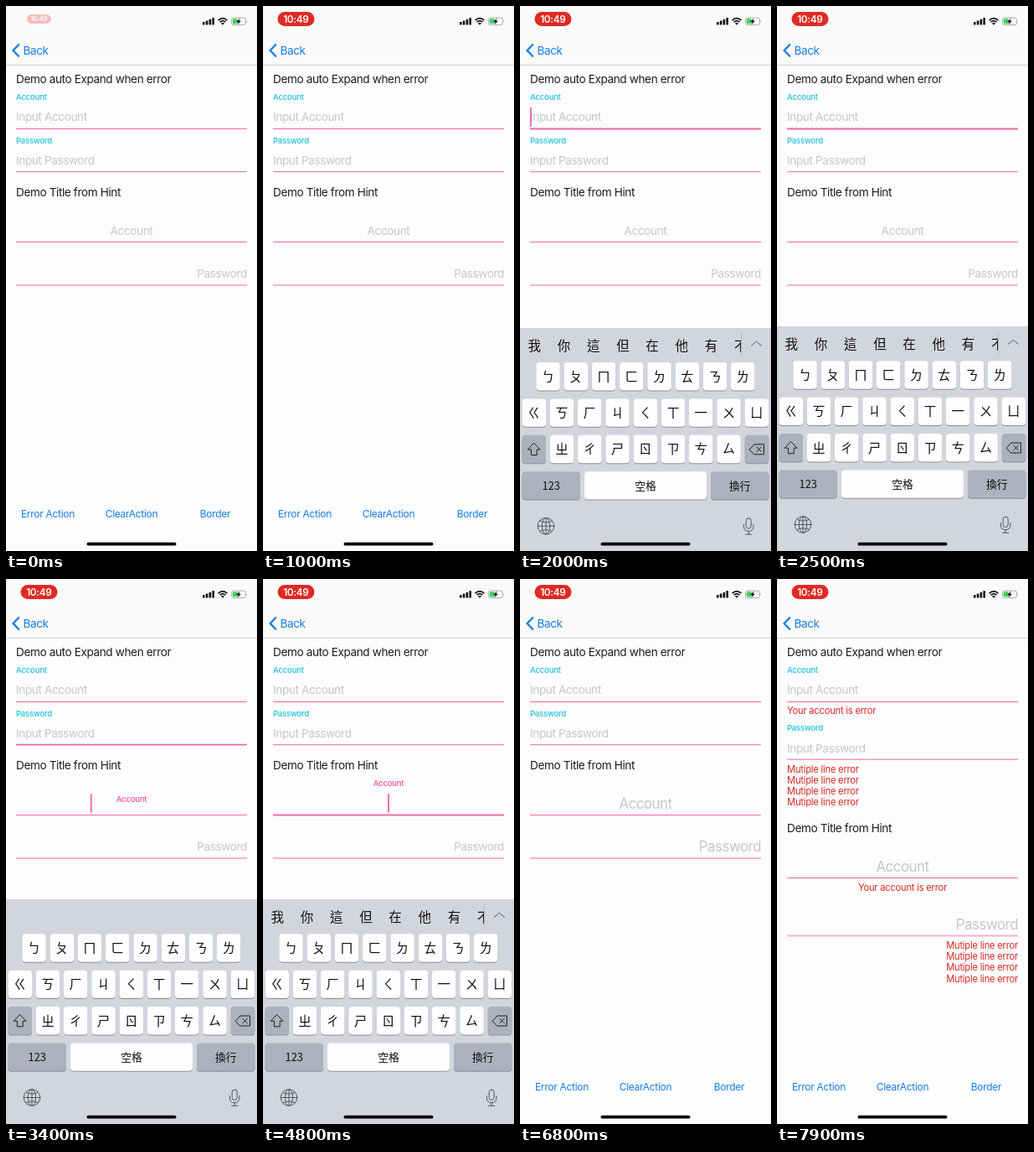
Animation, 300 px wide and 650 px high, one loop 8000 ms. Source, as an HTML page:

```html
<!DOCTYPE html>
<html lang="en">
<head>
<meta charset="utf-8">
<title>Text field demo</title>
<style>
html, body { margin: 0; width: 100%; height: 100%; overflow: hidden; background: #fdfcfe; }
svg { display: block; width: 300px; height: 650px; }
text { font-family: Inter, Roboto, sans-serif; font-size: 13.6px; letter-spacing: -.029em; fill: #1c1c1e; }
.mid { text-anchor: middle; }
.end { text-anchor: end; }
.hint { fill: #c6c6cb; }
.title { font-size: 9.6px; font-weight: 500; letter-spacing: -.025em; fill: #1fc3d6; }
.blue { fill: #157ee0; }
.action { font-size: 12px; letter-spacing: -.024em; }
.error text { font-size: 11.2px; letter-spacing: -.02em; fill: #d62a20; }
.line { stroke: #ee69a3; stroke-width: 1; }
.cursor { fill: #ef5a9c; }
.cjk { font-family: "Noto Sans CJK TC", "Noto Sans CJK JP", "Noto Sans CJK", sans-serif; font-size: 15.5px; letter-spacing: 0; text-anchor: middle; fill: #111; }
.label { font-size: 12.8px; }
.icon { fill: none; stroke: #222; stroke-width: 1; stroke-linecap: round; stroke-linejoin: round; }
.thin { stroke: #555a62; }

/* every timeline is one 8 s loop */
.pill, .line, .caret, .float, .shift, .error, .keyboard, .words, .tap {
  animation: 8s linear infinite;
}
.pill { transform-origin: 39.5px 15.5px; animation-name: pill; }
@keyframes pill {
  0% { transform: scale(.65); opacity: .28; }
  3.75%, 100% { transform: none; opacity: 1; }
}

.keyboard { animation-name: keyboard; }
@keyframes keyboard {
  0%, 20.6% { transform: translateY(270px); animation-timing-function: cubic-bezier(.2, .8, .2, 1); }
  26.25%, 78.1% { transform: none; animation-timing-function: cubic-bezier(.3, .5, .2, 1); }
  83.5%, 100% { transform: translateY(270px); }
}
.words { animation-name: words; animation-timing-function: step-end; }
@keyframes words {
  0%, 35%, 46.25%, 63.75% { opacity: 1; }
  32.5%, 41.25%, 61.25% { opacity: 0; }
}

.l1 { animation-name: line1; }
.l2 { animation-name: line2; }
.l3 { animation-name: line3; }
.l4 { animation-name: line4; }
@keyframes line1 { 0%, 21%, 34%, 100% { stroke-width: 1; } 22.5%, 32.5% { stroke-width: 1.8; } }
@keyframes line2 { 0%, 32.5%, 44%, 100% { stroke-width: 1; } 34%, 42.5% { stroke-width: 1.8; } }
@keyframes line3 { 0%, 42.5%, 63%, 100% { stroke-width: 1; } 44%, 61.25% { stroke-width: 1.8; } }
@keyframes line4 { 0%, 61.25%, 80%, 100% { stroke-width: 1; } 63%, 78.1% { stroke-width: 1.8; } }

.caret { opacity: 0; animation-timing-function: step-end; }
.c1 { animation-name: caret1; }
.c2 { animation-name: caret2; }
.c3 { animation-name: caret3; }
.c4 { animation-name: caret4; }
@keyframes caret1 { 0%, 32.5% { opacity: 0; } 21.25% { opacity: 1; } }
@keyframes caret2 { 0%, 41.25% { opacity: 0; } 32.5% { opacity: 1; } }
@keyframes caret3 { 0%, 61.25% { opacity: 0; } 41.25% { opacity: 1; } }
@keyframes caret4 { 0%, 78.1% { opacity: 0; } 61.25% { opacity: 1; } }
.cursor { animation: blink 1s linear infinite; animation-delay: var(--from); }
@keyframes blink { 0%, 60%, 100% { opacity: 1; } 70%, 90% { opacity: 0; } }
.slide { animation: slide 8s linear infinite; }
@keyframes slide {
  0%, 41.25% { transform: translateX(-137px); animation-timing-function: ease-in-out; }
  43.4%, 100% { transform: none; }
}

/* a hint turns into a small title and returns larger */
.f3 { animation-name: float3; }
.f4 { animation-name: float4; }
@keyframes float3 {
  0%, 41.25% { transform: none; font-size: 13.6px; font-weight: 400; fill: #c6c6cb; }
  41.26% { transform: translateY(-1px); font-size: 9.6px; font-weight: 500; fill: #e8589b; animation-timing-function: ease-in-out; }
  45%, 61.25% { transform: translateY(-25.5px); font-size: 9.6px; font-weight: 500; fill: #e8589b; }
  61.26% { transform: translateY(-25.5px); font-size: 16.9px; font-weight: 400; fill: #c6c6cb; animation-timing-function: ease-in-out; }
  65%, 100% { transform: translateY(1px); font-size: 16.9px; font-weight: 400; fill: #c6c6cb; }
}
@keyframes float4 {
  0%, 61.25% { transform: none; font-size: 13.6px; font-weight: 400; fill: #c6c6cb; }
  61.26% { transform: translateY(-1px); font-size: 9.6px; font-weight: 500; fill: #e8589b; animation-timing-function: ease-in-out; }
  65%, 78.1% { transform: translateY(-25.5px); font-size: 9.6px; font-weight: 500; fill: #e8589b; }
  78.11% { transform: translateY(-25.5px); font-size: 16.9px; font-weight: 400; fill: #c6c6cb; animation-timing-function: ease-in-out; }
  82%, 100% { transform: translateY(1px); font-size: 16.9px; font-weight: 400; fill: #c6c6cb; }
}

/* errors open and push the rows below */
.shift { animation-name: shift; }
@keyframes shift {
  0%, 92.5% { transform: none; animation-timing-function: ease-in-out; }
  96.25%, 100% { transform: translateY(var(--by)); }
}
.error { animation-name: error; }
@keyframes error { 0%, 92.5% { opacity: 0; } 96.25%, 100% { opacity: 1; } }
.tap { animation-name: tap; }
@keyframes tap { 0%, 91%, 94.5%, 100% { opacity: 1; } 91.3%, 92.5% { opacity: .25; } }
</style>
</head>
<body>
<svg viewBox="0 0 300 650">
  <rect width="300" height="650" fill="#fdfcfe"/>
  <rect width="300" height="70" fill="#fafafb"/>
  <path d="M0 70.5H300" stroke="#d3d3d7"/>

  <g class="pill">
    <rect x="17.5" y="7" width="44" height="17" rx="8.5" fill="#e02a23"/>
    <text class="mid" x="39.3" y="19.8" style="font-size:11.8px;font-weight:600;fill:#fff">10:49</text>
  </g>

  <g fill="#111">
    <rect x="235" y="19" width="2.6" height="3.4" rx=".6"/>
    <rect x="238.8" y="17.6" width="2.6" height="4.8" rx=".6"/>
    <rect x="242.6" y="15.8" width="2.6" height="6.6" rx=".6"/>
    <rect x="246.4" y="14" width="2.6" height="8.4" rx=".6"/>
    <path d="M257 20.6Q259 19 261 20.6L259 22.7Z"/>
  </g>
  <path d="M253.6 17.1Q259 12.2 264.4 17.1M255.6 19.2Q259 16.2 262.4 19.2" fill="none" stroke="#111" stroke-width="1.7"/>
  <rect x="269.5" y="14" width="17" height="8.6" rx="2.4" fill="none" stroke="#a5a5a8" stroke-width=".9"/>
  <rect x="270.8" y="15.3" width="6" height="6" rx="1.2" fill="#3fd25f"/>
  <path d="M287.6 16.8Q289 18.3 287.6 19.8Z" fill="#a5a5a8"/>
  <path d="M279.6 14.6L275.2 18.9H277.6L276.6 22.2L281 17.7H278.6Z" fill="#111"/>

  <path d="M15.8 45.5L8.6 53L15.8 60.5" fill="none" stroke="#157ee0" stroke-width="2.3"/>
  <text class="blue" x="20.5" y="58">Back</text>

  <text x="12" y="91.6">Demo auto Expand when error</text>
  <text class="title" x="12" y="112">Account</text>
  <text class="hint" x="12" y="137.4">Input Account</text>
  <path class="line l1" d="M12 146.5H288"/>
  <g class="caret c1"><rect class="cursor" style="--from:-.3s" x="12" y="121" width="1.7" height="23"/></g>
  <g class="error"><text x="12" y="161">Your account is error</text></g>

  <g class="shift" style="--by:17.5px">
    <text class="title" x="12" y="163.5">Password</text>
    <text class="hint" x="12" y="189">Input Password</text>
    <path class="line l2" d="M12 197.7H288"/>
    <g class="caret c2"><rect class="cursor" style="--from:-.4s" x="12" y="172.5" width="1.7" height="23"/></g>
    <g class="error" data-x="12" data-y="213"></g>
  </g>

  <g class="shift" style="--by:75px">
    <text x="12" y="227">Demo Title from Hint</text>
    <text class="float f3 mid" x="150" y="272.5">Account</text>
    <path class="line l3" d="M12 281.5H288"/>
    <g class="caret c3"><g class="slide"><rect class="cursor" style="--from:-.7s" x="149.2" y="256.3" width="1.7" height="22.4"/></g></g>
    <g class="error"><text class="mid" x="150" y="296.6">Your account is error</text></g>
  </g>

  <g class="shift" style="--by:92.5px">
    <text class="float f4 end" x="288" y="324">Password</text>
    <path class="line l4" d="M12 333H288"/>
    <g class="caret c4"><rect class="cursor" style="--from:-.45s" x="286.3" y="308" width="1.7" height="22"/></g>
    <g class="error end" data-x="288" data-y="348.3"></g>
  </g>

  <text class="action blue mid tap" x="50" y="609.5">Error Action</text>
  <text class="action blue mid" x="150" y="609.5">ClearAction</text>
  <text class="action blue mid" x="250" y="609.5">Border</text>

  <g class="keyboard">
    <rect y="382" width="300" height="272" fill="#d2d5dc"/>
    <g class="words">
      <clipPath id="bar"><rect y="382" width="264.5" height="40"/></clipPath>
      <g id="words" clip-path="url(#bar)"></g>
      <path d="M264.5 388V416" stroke="#b3b6bd" stroke-width=".8"/>
      <path class="icon thin" d="M276.5 403.3L282.5 398.3L288.5 403.3"/>
    </g>
    <g id="keys"></g>
    <path class="icon" d="M16.8 519.8L24 527.2H20.2V533.8H13.4V527.2H9.6Z"/>
    <path class="icon" d="M274.5 527L280 521H291.5V533H280ZM282.8 524.2L288.4 529.8M288.4 524.2L282.8 529.8"/>
    <g class="icon thin">
      <circle cx="31" cy="618.5" r="9.8"/>
      <ellipse cx="31" cy="618.5" rx="4.7" ry="9.8"/>
      <path d="M31 608.7V628.3M21.2 618.5H40.8M23.6 612.4Q31 616 38.4 612.4M23.6 624.6Q31 621 38.4 624.6"/>
      <rect x="270.2" y="609" width="6" height="12.5" rx="3"/>
      <path d="M267.4 616.5V619Q267.6 624.7 273.2 624.7Q278.8 624.7 279 619V616.5M273.2 624.7V628.3M269.6 628.3H276.8"/>
    </g>
  </g>

  <rect x="96.5" y="639.8" width="107" height="3.8" rx="1.9" fill="#050505"/>
</svg>
<script>
const NS = "http://www.w3.org/2000/svg";

function add(parent, tag, attrs, text = "") {
  const el = document.createElementNS(NS, tag);
  for (const name in attrs) el.setAttribute(name, attrs[name]);
  el.textContent = text;
  parent.append(el);
}

const keys = document.getElementById("keys");
const words = document.getElementById("words");
const HEIGHT = 33.4, PITCH = 33.25, WIDTH = 28.5;

function key(x, y, width, label, dark, small) {
  const box = { x, width, height: HEIGHT, rx: 4 };
  add(keys, "rect", { ...box, y: y + 1, fill: "#8d9097" });
  add(keys, "rect", { ...box, y, fill: dark ? "#adb1bd" : "#fefefe" });
  add(keys, "text", {
    x: x + width / 2,
    y: y + (small ? 21.4 : 22.6),
    class: small ? "cjk label" : "cjk"
  }, label);
}

function row(x, y, labels) {
  [...labels].forEach((label, i) => key(x + i * PITCH, y, WIDTH, label));
}

row(19.3, 423.3, "ㄅㄆㄇㄈㄉㄊㄋㄌ");
row(2.5, 466.7, "ㄍㄎㄏㄐㄑㄒ一ㄨㄩ");
row(35.8, 510, "ㄓㄔㄕㄖㄗㄘㄙ");
key(2.5, 510, WIDTH, "", true);
key(268.8, 510, WIDTH, "", true);
key(2.5, 553.4, 69.5, "123", true, true);
key(77, 553.4, 146, "空格", false, true);
key(228, 553.4, 69.5, "換行", true, true);

[..."我你這但在他有不"].forEach((word, i) =>
  add(words, "text", { x: 17.3 + i * 35.2, y: 408.8, class: "cjk" }, word));

for (const box of document.querySelectorAll(".error[data-x]")) {
  for (let i = 0; i < 4; i++) {
    add(box, "text", { x: box.dataset.x, y: +box.dataset.y + i * 13.3 }, "Mutiple line error");
  }
}
</script>
</body>
</html>
```
